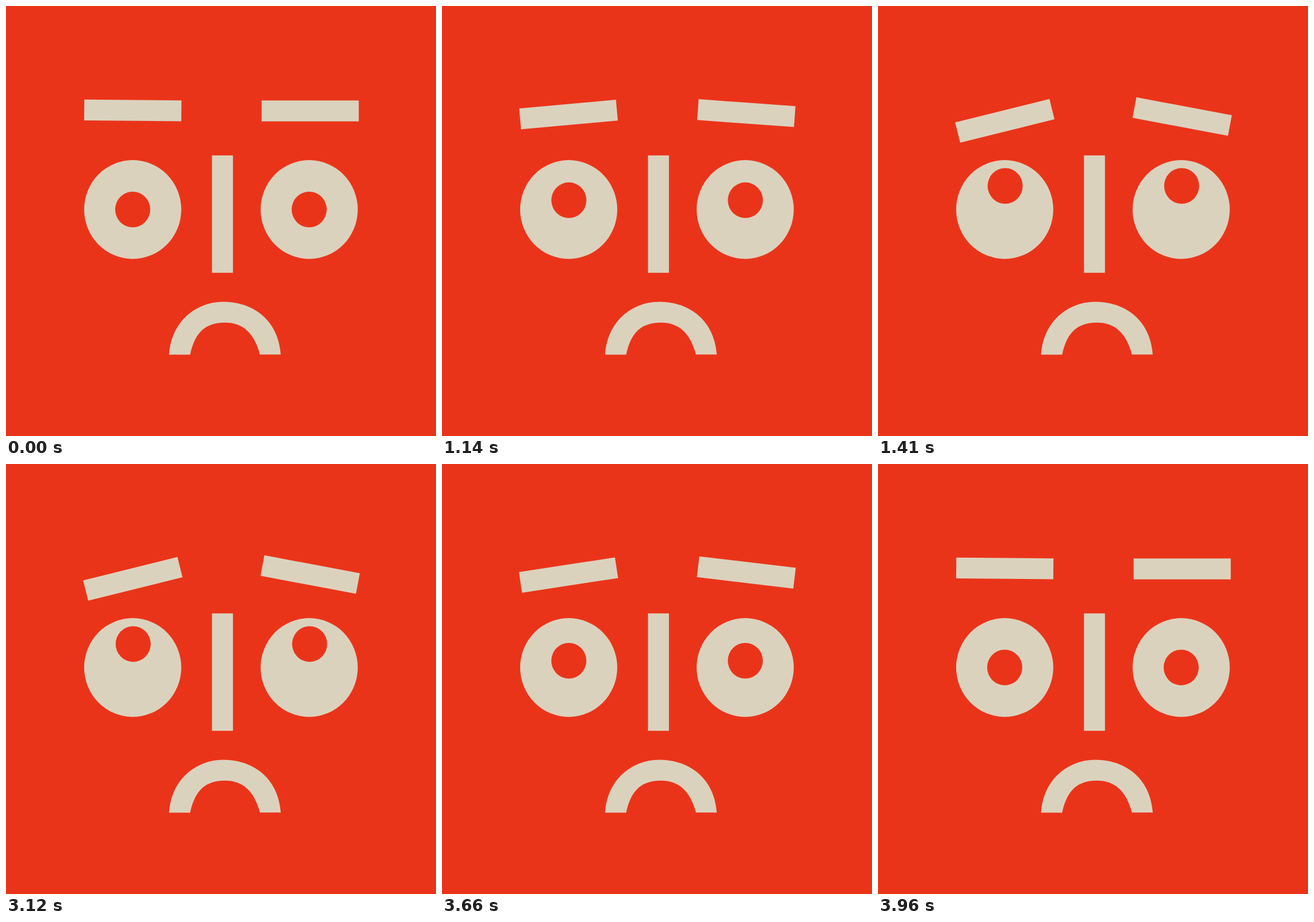
Recreate the animation shown at these times as an HTML page. Size 748 by 748 pixels, loop 5430 ms.

```html
<!DOCTYPE html>
<html lang="en">
<head>
<meta charset="utf-8">
<title>Worried face</title>
<style>
  html, body { margin: 0; height: 100%; overflow: hidden; background: #ea341a; }
  svg { display: block; width: 100vw; height: 100vh; }
</style>
</head>
<body>
<svg viewBox="0 0 748 748" fill="#dbd2bd">
  <rect id="leftBrow" x="136" y="164.15" width="169" height="36.3"/>
  <rect id="rightBrow" x="444.7" y="164.3" width="168.9" height="36.4"/>
  <ellipse cx="220.4" cy="354" rx="84.5" ry="85.9"/>
  <ellipse cx="527.4" cy="354" rx="84.5" ry="85.9"/>
  <g id="pupils" fill="#ea341a">
    <ellipse cx="220.4" cy="354" rx="30.5" ry="31"/>
    <ellipse cx="527.4" cy="354" rx="30.5" ry="31"/>
  </g>
  <rect x="358.3" y="259.9" width="36.5" height="204.2"/>
  <path d="M283.6 606.6C285 582 294 560 310 543C329 524 352 514.5 378.5 514.5
           C432 515 474 548 478 606.2H441.8C432 569 412 550.5 380.5 550.7
           C348 551 329 566 320.3 606.6Z"/>
</svg>
<script>
  const LOOP = 5430, TICK = 30;
  const [leftBrow, rightBrow, pupils] =
    ['leftBrow', 'rightBrow', 'pupils'].map(id => document.getElementById(id));

  function ease(from, to, now) {
    const p = Math.min(1, Math.max(0, (now - from) / (to - from)));
    return p * p * (3 - 2 * p);
  }

  function draw() {
    const tick = Math.floor(performance.now() % LOOP / TICK);
    // The motion is keyed at 30 steps a second and shown every 30 ms.
    const step = Math.round(tick * 0.9);
    const rise = ease(28, 42, step);
    const look = rise - ease(93, 119.3, step);
    const worry = rise - ease(103.8, 119, step);

    pupils.setAttribute('transform', `translate(${0.8 * look} ${-41 * look})`);
    leftBrow.setAttribute('transform', `rotate(${0.55 - 14.5 * worry} 292 190.6)`);
    rightBrow.setAttribute('transform', `rotate(${10.6 * worry} 476.7 187.3)`);
    requestAnimationFrame(draw);
  }
  draw();
</script>
</body>
</html>
```
